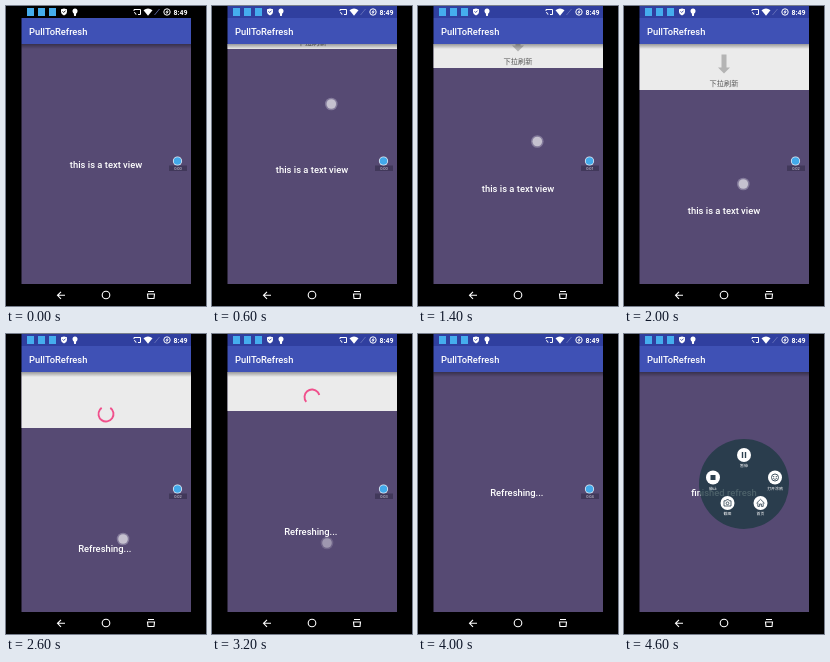
An HTML page with a canvas that plays this animation: 200 px wide and 300 px high, repeating every 4.8 s.

```html
<!DOCTYPE html>
<html>
<head>
<meta charset="utf-8">
<style>
html, body { margin: 0; width: 100%; height: 100%; overflow: hidden; background: #000; }
canvas { display: block; }
</style>
</head>
<body>
<canvas id="stage" width="200" height="300"></canvas>
<script>
const c = document.getElementById('stage').getContext('2d');
const STEP = 200, LOOP = 4800, TAU = Math.PI * 2;
const LEFT = 15.5, WIDTH = 169.5;
const SANS = 'Roboto, "Noto Sans CJK SC", "Noto Sans CJK", sans-serif';

// One value per 200 ms step
const pull = [0, 0, 0, 5, 9, 13, 19, 24, 31, 39, 46, 51, 56, 56, 56, 56, 39, 29];
const touchY = [87, 98, 106, 112, 124, 135.5, 149, 164, 178, 189, 200, 205, 208, 209, 209]; // from step 2
const arcs = [[-100, 120], [-75, 175], [-55, 235], [0, 275], [60, 315], [140, 345], [200, 380]]; // from step 11

function rect(x, y, w, h, color) {
  c.fillStyle = color;
  c.fillRect(x, y, w, h);
}

function disc(x, y, r, color) {
  c.fillStyle = color;
  c.beginPath();
  c.arc(x, y, r, 0, TAU);
  c.fill();
}

function arc(x, y, r, from, to, color, width) {
  c.strokeStyle = color;
  c.lineWidth = width;
  c.beginPath();
  c.arc(x, y, r, from * TAU / 360, to * TAU / 360);
  c.stroke();
}

function path(d, color, width) {
  const p = new Path2D(d);
  if (width) {
    c.strokeStyle = color;
    c.lineWidth = width;
    c.stroke(p);
  } else {
    c.fillStyle = color;
    c.fill(p);
  }
}

function text(s, x, y, size, color = '#fff', align = 'center', weight = 400) {
  c.font = `${weight} ${size}px ${SANS}`;
  c.textAlign = align;
  c.fillStyle = color;
  c.fillText(s, x, y);
}

function statusBar(step) {
  const back = step ? '#303f9f' : '#000';
  rect(LEFT, 0, WIDTH, 12, back);
  for (const x of [21, 32, 43]) rect(x, 2, 7, 8, '#45adee');
  path('M58 2.5L61 3.3V6Q61 8.2 58 9.5Q55 8.2 55 6V3.3Z', '#fff');
  path('M56.5 5.3L57.7 6.5L59.6 4.6', back, .9);
  disc(69, 5, 2.5, '#fff');
  path('M67.5 6H70.5L69.8 10H68.2Z', '#fff');
  path('M128 5V3.5H134.5V8.5H132M128 6.5Q130 6.7 130 8.7', '#fff', 1);
  path('M137.5 4.2Q142 1 146.5 4.2L142 9.7Z', '#fff');
  path('M148.5 9L153.5 3', '#6f79bd', .8);
  arc(161, 6, 3.2, 0, 360, '#fff', 1);
  path('M161.8 3.5L159.3 6.5H160.8L160.2 8.7L162.8 5.6H161.3Z', '#fff');
  text('8:49', 181.5, 9, 7, '#fff', 'right', 700);
}

function toolbar() {
  rect(LEFT, 12, WIDTH, 26, '#3f51b5');
  text('PullToRefresh', 23, 29, 9.35, '#fff', 'left', 500);
  const shade = c.createLinearGradient(0, 38, 0, 43);
  shade.addColorStop(0, 'rgba(0,0,0,.35)');
  shade.addColorStop(1, 'rgba(0,0,0,0)');
  rect(LEFT, 38, WIDTH, 5, shade);
}

function header(step, bottom) {
  rect(LEFT, 38, WIDTH, bottom - 38, '#ebebeb');
  if (step < 11) {
    c.save();
    c.translate(100, bottom);
    path('M-2.5 -35.5H2.5V-22.5H6L0 -16.5L-6 -22.5H-2.5Z', '#b4b4b4');
    c.restore();
    text('下拉刷新', 100, bottom - 4, 7.2, '#555');
  } else {
    arc(100, bottom - 14, 7.5, ...arcs[step - 11], '#f0508c', 1.9);
  }
}

function touch(step) {
  const y = touchY[step - 2];
  if (!y) return;
  const x = step < 11 ? 119.3 : Math.max(115, 119.3 - (step - 10) * .75);
  c.globalAlpha = step < 16 ? 1 : .55;
  disc(x, y, 6.3, 'rgba(200,195,215,.4)');
  disc(x, y, 4.8, '#c5c1cf');
  c.globalAlpha = 1;
}

function recorder(step) {
  if (step > 22) return;
  if (step < 22) {
    rect(163, 159.5, 18, 5.5, '#41385a');
    text('0:0' + Math.floor(step / 5), 172, 164, 4, '#d5d2de');
  }
  disc(171.5, 155, 4.6, '#e6eef6');
  disc(171.5, 155, 3.8, '#42a9ea');
}

function menu() {
  disc(120, 150, 45, 'rgba(32,58,68,.8)');
  const items = [[120, 121, '暂停'], [89, 143.5, '停止'], [151, 143.5, '打开涂鸦'],
    [103.5, 169, '截图'], [136.5, 169, '首页']];
  for (const [x, y, label] of items) {
    disc(x, y, 7, '#fff');
    text(label, x, y + 12.3, 3.9);
  }
  const ink = '#2d4150';
  rect(117.8, 118, 1.4, 6, ink);
  rect(120.8, 118, 1.4, 6, ink);
  rect(86.5, 141, 5, 5, ink);
  arc(151, 143.5, 3.5, 0, 360, ink, .9);
  arc(151, 143.5, 1.8, 20, 160, ink, .8);
  disc(149.7, 142.7, .6, ink);
  disc(152.3, 142.7, .6, ink);
  path('M100 166.8H102L102.7 165.6H104.5L105.2 166.8H107V172H100Z', ink, .8);
  arc(103.5, 169.3, 1.4, 0, 360, ink, .8);
  path('M132.5 169.2L136.5 165.3L140.5 169.2M133.8 168.6V172.4H135.6V170H137.4V172.4H139.2V168.6', ink, .8);
}

function navBar() {
  rect(LEFT, 278, WIDTH, 22, '#000');
  path('M59 289.3H51.5M55 285.8L51.5 289.3L55 292.8', '#fff', 1.1);
  arc(100, 289, 3.8, 0, 360, '#fff', 1.1);
  path('M142 285.5H148M141.5 288H148.5L148 292.5H142Z', '#fff', 1.1);
}

function draw(now) {
  const step = Math.floor(now % LOOP / STEP);
  const offset = pull[step] || 0;
  const message = step < 11 ? 'this is a text view' : step < 21 ? 'Refreshing... ' : 'finished refresh';
  rect(0, 0, 200, 300, '#000');
  rect(LEFT, 38, WIDTH, 240, '#564a73');
  if (offset) header(step, 38 + offset);
  text(message, 100, 162 + offset, 9.4, '#fff', 'center', 500);
  statusBar(step);
  toolbar();
  navBar();
  recorder(step);
  touch(step);
  if (step == 23) menu();
}

const start = performance.now();
function tick() {
  draw(performance.now() - start);
  requestAnimationFrame(tick);
}
tick();
</script>
</body>
</html>
```
